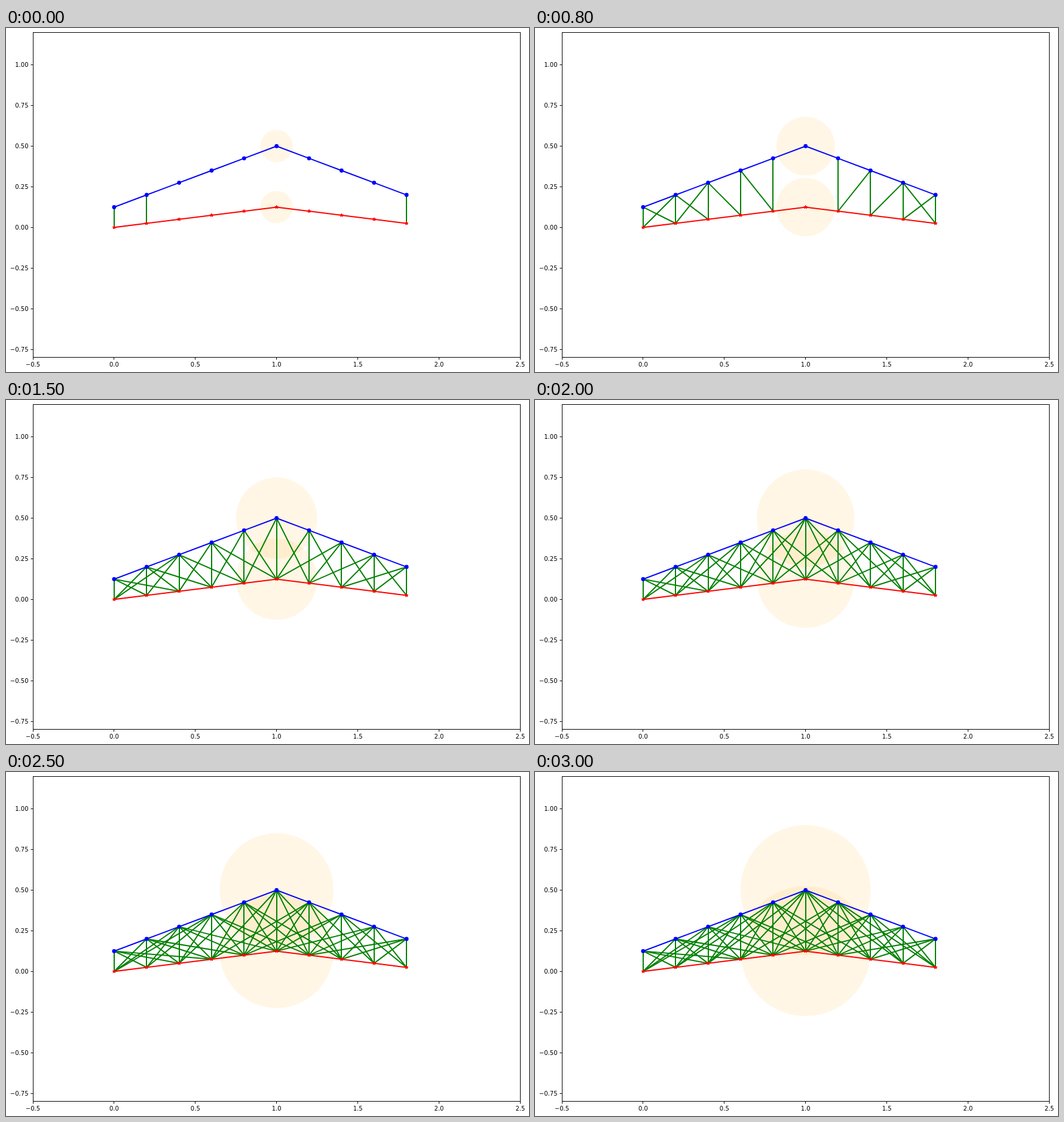
Recreate the animation shown at these times as an HTML page. Size 875 by 575 pixels, loop 3100 ms.

```html
<!DOCTYPE html>
<html lang="en">
<head>
<meta charset="utf-8">
<title>Truss linking by distance</title>
<style>
  html, body { margin: 0; width: 100%; height: 100%; overflow: hidden; background: #fff; }
  svg { display: block; }
  text { font: 10px "DejaVu Sans", sans-serif; }
  #halos { fill: orange; fill-opacity: .1; }
  #webs, #chords { fill: none; stroke-width: 2; }
  #webs { stroke: #008000; stroke-linecap: square; }
  #axes { fill: none; stroke: #000; }
</style>
</head>
<body>
<svg width="875" height="575" viewBox="0 0 875 575">
  <g id="halos"></g>
  <g id="webs"></g>
  <g id="chords"></g>
  <g id="axes"></g>
  <g id="labels"></g>
</svg>
<script>
const UNIT = 271.8, LEFT = 45, BOTTOM = 550.8;
const STEP = 100, STEPS = 31;
const X = v => LEFT + UNIT * (v + 0.5);
const Y = v => BOTTOM - UNIT * (v + 0.8);
const snap = v => Math.floor(v) + 0.5;

function add(parent, tag, attrs, text) {
  const el = document.createElementNS('http://www.w3.org/2000/svg', tag);
  for (const name in attrs) el.setAttribute(name, attrs[name]);
  if (text) el.textContent = text;
  document.getElementById(parent).appendChild(el);
  return el;
}

// Ten nodes per chord, rising to a peak at the sixth
const chord = (base, rise) => Array.from({ length: 10 }, (_, i) =>
  ({ x: i * 0.2, y: base + rise * (5 - Math.abs(i - 5)) }));
const upper = chord(0.125, 0.075);
const lower = chord(0, 0.025);

function starPoints(cx, cy, radius) {
  return Array.from({ length: 10 }, (_, k) => {
    const r = k % 2 ? radius * 0.382 : radius;
    const a = k * Math.PI / 5;
    return `${cx + r * Math.sin(a)},${cy - r * Math.cos(a)}`;
  }).join(' ');
}

function drawChord(nodes, color, mark) {
  add('chords', 'polyline', {
    points: nodes.map(p => `${X(p.x)},${Y(p.y)}`).join(' '),
    stroke: color, 'stroke-linejoin': 'round', 'stroke-linecap': 'square'
  });
  nodes.forEach(p => mark(X(p.x), Y(p.y)));
}

const halos = [upper[5], lower[5]].map(p =>
  add('halos', 'circle', { cx: X(p.x), cy: Y(p.y) }));

const webs = [];
for (const a of upper) for (const b of lower) {
  const reach = Math.hypot(a.x - b.x, a.y - b.y);
  if (reach > 0.8) continue;
  const fit = a.x === b.x ? Math.round : v => v;
  const el = add('webs', 'line', {
    x1: fit(X(a.x)), y1: Y(a.y), x2: fit(X(b.x)), y2: Y(b.y)
  });
  webs.push({ el, reach });
}

drawChord(upper, '#00f', (cx, cy) =>
  add('chords', 'circle', { cx, cy, r: 3.4, fill: '#00f' }));
drawChord(lower, '#f00', (cx, cy) =>
  add('chords', 'polygon', {
    points: starPoints(cx, cy, 3), fill: '#f00', stroke: '#f00',
    'stroke-linejoin': 'bevel', style: 'stroke-width:1'
  }));

add('axes', 'rect', { x: 45.5, y: 7.5, width: 815, height: 543 });
const sign = (v, digits) => v.toFixed(digits).replace('-', '\u2212');
for (let v = -0.5; v <= 2.5; v += 0.5) {
  add('axes', 'path', { d: `M${snap(X(v))} 551v3.5` });
  add('labels', 'text', { x: X(v), y: 566, 'text-anchor': 'middle' }, sign(v, 1));
}
for (let v = -0.75; v <= 1; v += 0.25) {
  add('axes', 'path', { d: `M45 ${snap(Y(v))}h-3.5` });
  add('labels', 'text', { x: 37.5, y: Math.round(Y(v) + 3.8), 'text-anchor': 'end' }, sign(v, 2));
}

// Halos grow stepwise; a web appears once two halos of that size would touch
let shown = -1;
function frame() {
  const step = Math.floor(performance.now() / STEP) % STEPS;
  if (step !== shown) {
    shown = step;
    const radius = 0.1 + step * 0.01;
    halos.forEach(c => c.setAttribute('r', radius * UNIT));
    webs.forEach(w => w.el.setAttribute('visibility', w.reach <= 2 * radius ? 'visible' : 'hidden'));
  }
  requestAnimationFrame(frame);
}
frame();
</script>
</body>
</html>
```
